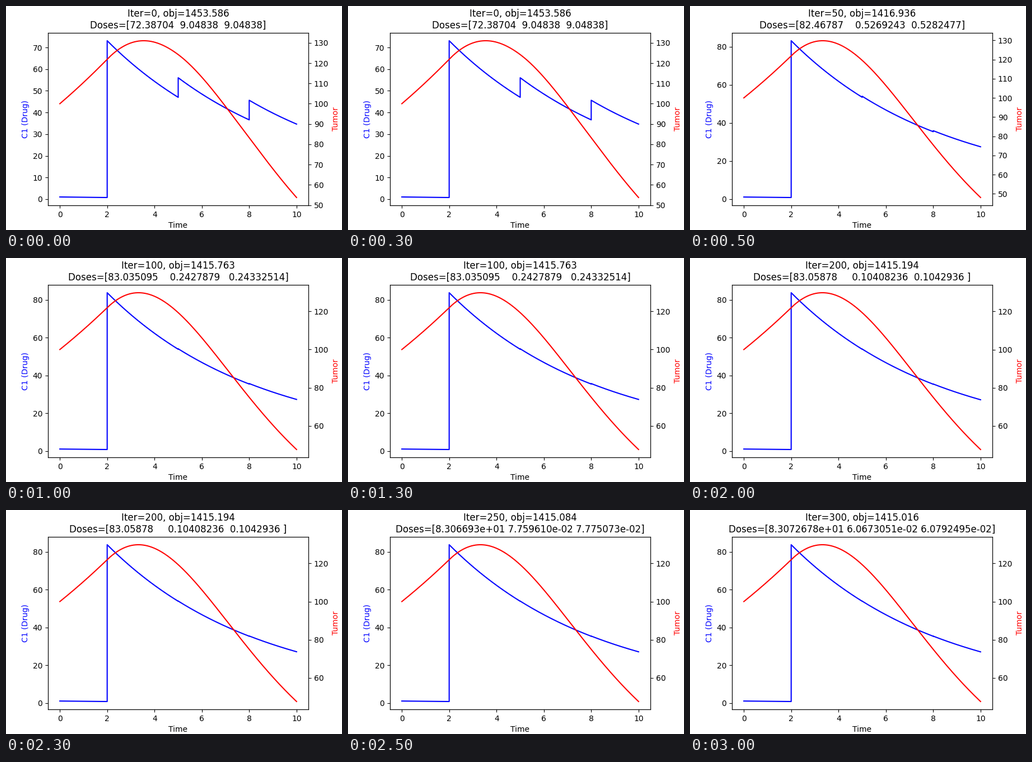
Animation, 600 px wide and 400 px high, one loop 3500 ms. Source, as a matplotlib script:

```python
import numpy as np
import matplotlib.pyplot as plt
from matplotlib.animation import FuncAnimation

# Two-compartment drug model with a tumor killed by the second compartment
K10, K12, K21 = 0.10, 0.05, 0.03
GROWTH, KILL = 0.10, 0.02
DOSE_TIMES = (0, 2, 5, 8)
END = 10

RUNS = [
    (0, 1453.586, (72.38704, 9.04838, 9.04838)),
    (50, 1416.936, (82.46787, 0.5269243, 0.5282477)),
    (100, 1415.763, (83.035095, 0.2427879, 0.24332514)),
    (150, 1415.381, (83.043175, 0.14986564, 0.1501791)),
    (200, 1415.194, (83.05878, 0.10408236, 0.1042936)),
    (250, 1415.084, (83.06693, 0.0775961, 0.07775073)),
    (300, 1415.016, (83.072678, 0.060673051, 0.060792495)),
]

total = K10 + K12 + K21
spread = np.sqrt(total ** 2 - 4 * K10 * K21)
fast, slow = (total + spread) / 2, (total - spread) / 2


def drug_response(s):
    """Drug level a time s after a unit dose."""
    return ((fast - K21) * np.exp(-fast * s) + (K21 - slow) * np.exp(-slow * s)) / spread


def exposure(s):
    """Integral of the second compartment after a unit dose."""
    return K12 / spread * ((1 - np.exp(-slow * s)) / slow - (1 - np.exp(-fast * s)) / fast)


def simulate(doses):
    """Time, drug and tumor curves; dose times appear twice to keep the jumps."""
    doses = (1, *doses)
    times, drug, tumor = [], [], []
    for i, (start, stop) in enumerate(zip(DOSE_TIMES, (*DOSE_TIMES[1:], END))):
        t = np.linspace(start, stop, 101)
        given = list(zip(DOSE_TIMES, doses))[:i + 1]
        times.append(t)
        drug.append(sum(d * drug_response(t - t0) for t0, d in given))
        killed = KILL * sum(d * exposure(t - t0) for t0, d in given)
        tumor.append(100 * np.exp(GROWTH * t - killed))
    return [np.concatenate(part) for part in (times, drug, tumor)]


def fit_limits(axis, values):
    low, high = values.min(), values.max()
    pad = 0.05 * (high - low)
    axis.set_ylim(low - pad, high + pad)


fig, ax = plt.subplots(figsize=(6, 4), dpi=100)
ax2 = ax.twinx()
drug_line, = ax.plot([], [], "b")
tumor_line, = ax2.plot([], [], "r")
ax.set_xlim(-0.5, END + 0.5)
ax.set_xticks(range(0, END + 1, 2))
ax.set_xlabel("Time")
ax.set_ylabel("C1 (Drug)", color="b")
ax2.set_ylabel("Tumor", color="r")


def update(i):
    step, obj, doses = RUNS[i]
    t, drug, tumor = simulate(doses)
    drug_line.set_data(t, drug)
    tumor_line.set_data(t, tumor)
    ax.set_yticks(range(0, 80, 10) if i == 0 else range(0, 81, 20))
    ax2.set_yticks(range(50, 131, 10) if i < 2 else range(60, 121, 20))
    fit_limits(ax, drug)
    fit_limits(ax2, tumor)
    ax.set_title(f"Iter={step}, obj={obj:.3f}\nDoses={np.array(doses, np.float32)}")
    return drug_line, tumor_line


anim = FuncAnimation(fig, update, frames=len(RUNS), interval=500,
                     repeat=True, repeat_delay=0, blit=False)
plt.show()
```
